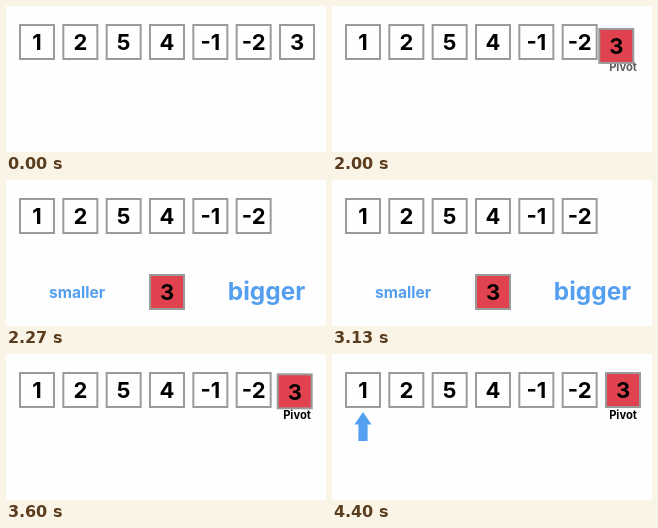
Write an HTML page that moves like this. It is 320 by 146 pixels and loops after 5.07 s.

```html
<!DOCTYPE html>
<html lang="en">
<head>
<meta charset="utf-8">
<title>Quicksort pivot</title>
<style>
  html, body { margin: 0; width: 100%; height: 100%; overflow: hidden; background: #fefefe; }
  svg { display: block; width: 100%; height: 100%; }
  text { font-family: Inter, "Open Sans", sans-serif; font-weight: 700; text-anchor: middle; }
  .box rect { fill: #fefefe; stroke: #999b9b; stroke-width: 2; }
  .box text { font-size: 22px; }
  .blue { fill: #549fef; }
</style>
</head>
<body>
<svg viewBox="0 0 320 146">
  <g id="boxes"></g>
  <text id="pivotLabel" x="291" y="65.3" font-size="11.2">Pivot</text>
  <g id="sides" class="blue">
    <text x="71" y="117.5" font-size="15.6">smaller</text>
    <text x="260.5" y="120" font-size="24.4">bigger</text>
  </g>
  <path id="arrow" class="blue" d="M31 58 L39.6 70.5 H35.6 V87 H26.4 V70.5 H22.4 Z"/>
</svg>
<script>
const LOOP = 5070, FPS = 15;
const MOVE = 3.9;                                  // length of a transition, in steps
const DOWN = 29.43, UP = 50.43, POINT = 58.43;     // transition starts, in steps
const MARK = 20;                                   // the pivot is marked here

const $ = id => document.getElementById(id);
const clamp = v => Math.min(1, Math.max(0, v));
const ease = t => (1 - Math.cos(Math.PI * t)) / 2;
const fadeOut = t => clamp(1 - 2.5 * t);
const fadeIn = t => clamp(2.5 * t - 1.25);

function addBox(value, i) {
  const svgNS = "http://www.w3.org/2000/svg";
  const box = document.createElementNS(svgNS, "g");
  box.setAttribute("class", "box");
  box.innerHTML = '<rect x="-17" y="-17" width="34" height="34"/>' +
                  `<text y="8.2">${value}</text>`;
  place(box, 31 + i * 260 / 6, 36);
  $("boxes").append(box);
  return box;
}

function place(node, x, y) {
  node.setAttribute("transform", `translate(${x.toFixed(2)} ${y.toFixed(2)})`);
}

const pivot = [1, 2, 5, 4, -1, -2, 3].map(addBox).pop();
$("boxes").parentNode.insertBefore(pivot, $("sides"));

function draw(ms) {
  const step = Math.floor((ms % LOOP + 4) * FPS / 1000);
  const phase = start => clamp((step - start) / MOVE);
  const down = phase(DOWN), up = phase(UP);
  const away = ease(down) - ease(up);
  const marked = step >= MARK;

  place(pivot, 291 - 130 * away, 36 + 76 * away);
  pivot.firstChild.style.fill = marked ? "#e0434f" : "";
  $("pivotLabel").style.opacity = marked ? Math.max(fadeOut(down), fadeIn(up)) : 0;
  $("sides").style.opacity = Math.min(fadeIn(down), fadeOut(up));
  $("arrow").style.opacity = fadeIn(phase(POINT));
}

const begin = performance.now();
function tick() {
  draw(performance.now() - begin);
  requestAnimationFrame(tick);
}
tick();
</script>
</body>
</html>
```
